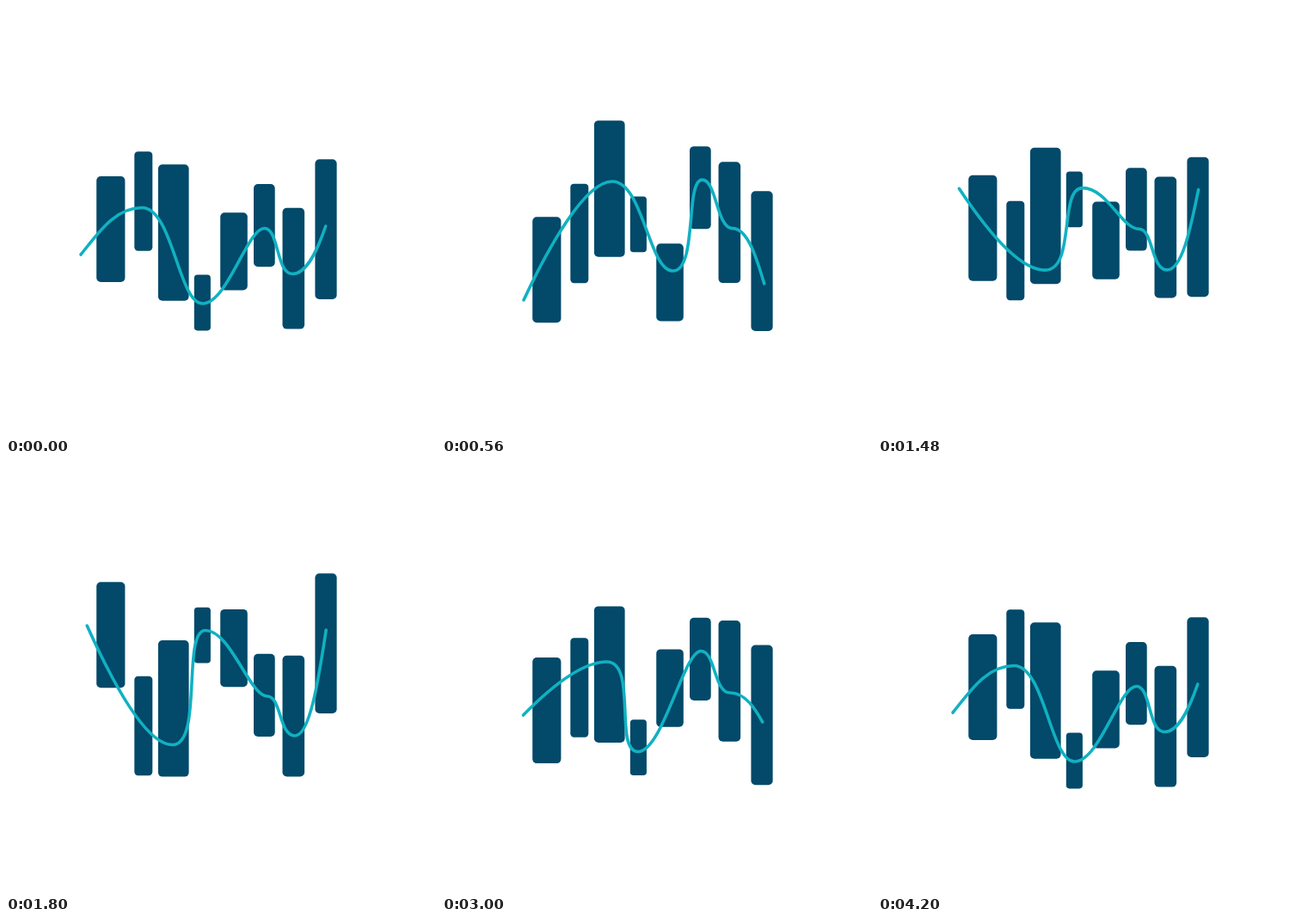
Animation, 500 px wide and 500 px high, one loop 4820 ms. Source, as an HTML page:

```html
<!DOCTYPE html>
<html lang="en">
<head>
<meta charset="utf-8">
<title>Bars and curve</title>
<style>
  html, body { margin: 0; width: 100%; height: 100%; overflow: hidden; background: #fff; }
  svg { display: block; width: 100%; height: 100%; }
  rect { fill: #034969; }
  path { fill: none; stroke: #10b1c2; stroke-width: 3.6; stroke-linecap: round; }
</style>
</head>
<body>
<svg viewBox="0 0 500 500"><g id="bars"></g><path id="curve"/></svg>
<script>
const LOOP = 4820, BEAT = 1200, MOVE = 600, TICK = 20;

// Each bar: left, width, height and its top edge in the four poses
const bars = [
  { x: 105.2, width: 33.2, height: 123, tops: [198, 248.7, 137.2, 225.1] },
  { x: 149.3, width: 21, height: 115.5, tops: [169.2, 209.3, 246.8, 202.2] },
  { x: 176.9, width: 35.7, height: 158.6, tops: [184.2, 129.5, 205, 165.4] },
  { x: 218.8, width: 19.1, height: 64.8, tops: [312.6, 214.9, 166.7, 297.3] },
  { x: 249.2, width: 31.6, height: 90.3, tops: [240.2, 278.8, 168.9, 215.4] },
  { x: 288, width: 24.7, height: 96.2, tops: [207, 160, 220.8, 178.8] },
  { x: 321.5, width: 25.6, height: 140.8, tops: [234.8, 177.5, 222.7, 182] },
  { x: 359.4, width: 25.2, height: 162.7, tops: [178.2, 218, 127.2, 210.5] }
];

// The six points of the curve in each pose
const poses = [
  [[87, 289], [158, 234.5], [228.5, 346], [300.5, 258.5], [333, 311.5], [371.7, 256]],
  [[95, 342], [198, 204], [268.5, 308], [302.5, 202], [338, 258.5], [374.7, 323]],
  [[94.2, 188], [193.5, 326.5], [232, 193.5], [303.5, 270], [336, 316], [372.2, 193]],
  [[94.5, 292], [191.5, 230], [227.7, 334.5], [301, 217.5], [335, 266], [372.7, 300]]
];

// Level handles before and after each inner point, the same in every pose
const handles = [[32, 36], [28, 29], [20, 17], [19, 18]];

const lerp = (a, b, p) => a + (b - a) * p;

// cubic-bezier(1/3, 0, 0, 1)
function ease(x) {
  let lo = 0, hi = 1;
  for (let i = 0; i < 30; i++) {
    const u = (lo + hi) / 2;
    if (u * (1 - u) ** 2 + u ** 3 < x) lo = u; else hi = u;
  }
  return lo * lo * (3 - 2 * lo);
}

function curvePath(points) {
  const [[x0, y0], ...inner] = points;
  const [x5, y5] = inner.pop();
  const [x1, y1] = inner[0], y4 = inner[3][1];
  let d = `M${x0} ${y0}C${lerp(x0, x1, 0.27)} ${lerp(y0, y1, 0.43)}`;
  inner.forEach(([x, y], i) => {
    const [before, after] = handles[i];
    d += ` ${x - before} ${y} ${x} ${y}C${x + after} ${y}`;
  });
  return d + ` ${x5 - 8} ${lerp(y5, y4, 0.42)} ${x5} ${y5}`;
}

const group = document.getElementById('bars');
const curve = document.getElementById('curve');
for (const bar of bars) {
  const { x, width, height } = bar;
  bar.rect = document.createElementNS('http://www.w3.org/2000/svg', 'rect');
  const shape = { x, width, height, rx: Math.min(5, width / 5) };
  for (const name in shape) bar.rect.setAttribute(name, shape[name]);
  group.append(bar.rect);
}

function draw(ms) {
  const t = Math.floor((ms % LOOP) / TICK + 0.05) * TICK;
  const from = Math.min(3, Math.floor(t / BEAT));
  const to = (from + 1) % 4;
  const p = Math.min(1, (t - from * BEAT) / MOVE);
  const q = ease(p);
  for (const { rect, tops } of bars) rect.setAttribute('y', lerp(tops[from], tops[to], p));
  const points = poses[from].map(([x, y], i) => {
    const [nextX, nextY] = poses[to][i];
    return [lerp(x, nextX, q), lerp(y, nextY, q)];
  });
  curve.setAttribute('d', curvePath(points));
}

let start;
function frame(now) {
  start ??= now;
  draw(now - start);
  requestAnimationFrame(frame);
}
draw(0);
requestAnimationFrame(frame);
</script>
</body>
</html>
```
